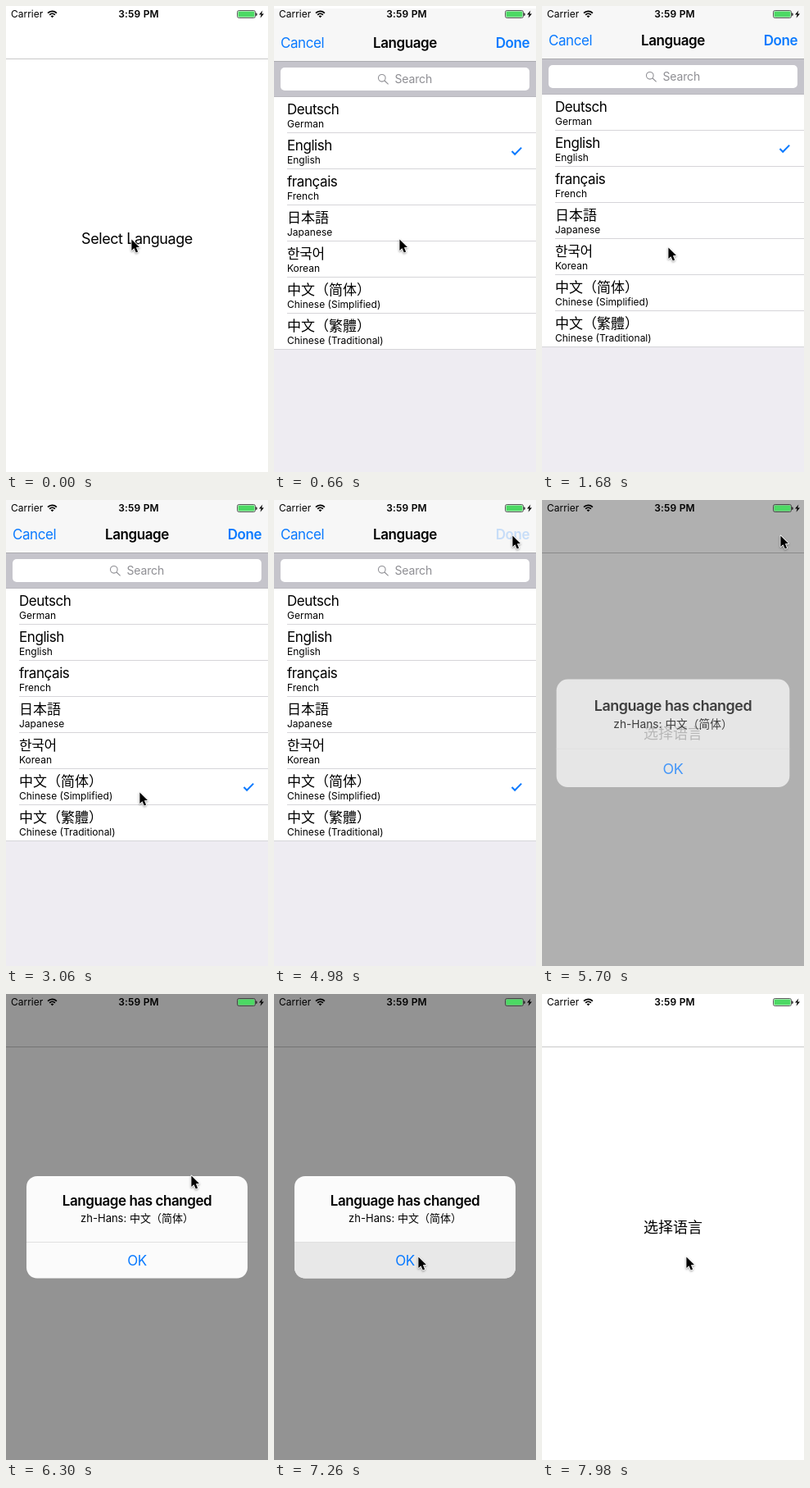
An HTML page with a canvas that plays this animation: 320x568 px, repeating every 8 s.

```html
<!DOCTYPE html>
<html lang="en">
<head>
<meta charset="utf-8">
<title>Language picker</title>
<style>
  html, body { margin: 0; width: 100%; height: 100%; overflow: hidden; background: #fff; }
  canvas { display: block; width: 320px; height: 568px; }
</style>
</head>
<body>
<canvas id="stage" width="320" height="568"></canvas>
<script>
const W = 320, H = 568, LOOP = 8000;
const ctx = document.getElementById('stage').getContext('2d');
const BLUE = '#0a7aff';

const LANGS = [
  ['Deutsch', 'German'],
  ['English', 'English'],
  ['français', 'French'],
  ['日本語', 'Japanese', 'JP'],
  ['한국어', 'Korean', 'KR'],
  ['中文（简体）', 'Chinese (Simplified)', 'SC'],
  ['中文（繁體）', 'Chinese (Traditional)', 'TC']
];

// Pointer path: time, x, y
const PATH = [
  [1500, 153, 284], [2280, 163, 356],
  [3660, 163, 356], [4620, 291, 43],
  [6120, 291, 43], [6300, 226, 220], [6720, 176, 320]
];

const clamp = v => Math.max(0, Math.min(1, v));
const ramp = (t, from, to) => clamp((t - from) / (to - from));
const smooth = p => p * p * (3 - 2 * p);

// Critically damped spring, 0 to 1
function spring(t, start) {
  const x = Math.max(0, t - start) * 0.01826;
  return 1 - (1 + x) * Math.exp(-x);
}

function text(str, x, y, size, opt = {}) {
  const { color = '#000', weight = 400, align = 'left', gap = 0, cjk = 'SC' } = opt;
  ctx.font = `${weight} ${size}px Inter, "Noto Sans CJK ${cjk}", "Noto Sans CJK", sans-serif`;
  ctx.letterSpacing = gap + 'px';
  ctx.textAlign = align;
  ctx.fillStyle = color;
  ctx.fillText(str, x, y);
}

function rect(x, y, w, h, color) {
  ctx.fillStyle = color;
  ctx.fillRect(x, y, w, h);
}

function round(x, y, w, h, r, color) {
  ctx.beginPath();
  ctx.roundRect(x, y, w, h, r);
  ctx.fillStyle = color;
  ctx.fill();
}

function trace(points, close) {
  ctx.beginPath();
  points.forEach(([x, y]) => ctx.lineTo(x, y));
  if (close) ctx.closePath();
}

function drawHome(t) {
  rect(0, 0, W, H, '#fff');
  rect(0, 64, W, 1, '#c8c8c8');
  if (t < 5000) text('Select Language', 160, 290, 18, { align: 'center', gap: -0.44 });
  else text('选择语言', 160, 291, 18, { align: 'center' });
}

function drawCheck(row, alpha) {
  const y = 108 + row * 44;
  ctx.globalAlpha = alpha;
  trace([[290.5, y + 22], [294.2, y + 25.8], [302.2, y + 17.6]]);
  ctx.strokeStyle = BLUE;
  ctx.lineWidth = 2;
  ctx.stroke();
  ctx.globalAlpha = 1;
}

function drawSearch() {
  rect(0, 64, W, 44, '#c5c4cb');
  rect(0, 64, W, 1, '#acacb0');
  rect(0, 107, W, 1, '#b9b8be');
  round(8, 72, 304, 28, 5, '#fff');
  ctx.strokeStyle = '#8e8e93';
  ctx.lineWidth = 1.1;
  ctx.beginPath();
  ctx.arc(131.8, 84.8, 4.3, 0, Math.PI * 2);
  ctx.moveTo(135, 88);
  ctx.lineTo(139.6, 92.4);
  ctx.stroke();
  text('Search', 147.5, 91, 14, { color: '#8e8e93', gap: -0.15 });
}

function drawPicker(t) {
  const up = spring(t, 265), down = spring(t, 5000);
  const offset = Math.round(H * (1 - up + down));
  if (offset >= H) return;

  ctx.save();
  ctx.translate(0, offset);
  rect(0, 0, W, H, '#eeecf2');
  rect(0, 0, W, 64, '#f7f7f7');
  text('Cancel', 8, 48, 17, { color: BLUE, gap: -0.43 });
  text('Language', 160, 48, 17, { weight: 600, align: 'center', gap: -0.43 });
  ctx.globalAlpha = t < 4860 ? 1 : 0.2 + 0.8 * ramp(t, 5000, 5300);
  text('Done', 312, 48, 17, { color: BLUE, weight: 600, align: 'right', gap: -0.43 });
  ctx.globalAlpha = 1;
  drawSearch();

  rect(0, 108, W, 44 * LANGS.length, '#fff');
  LANGS.forEach(([name, label, cjk], i) => {
    const y = 108 + i * 44;
    const ideographs = cjk && cjk !== 'KR';
    text(name, 16, y + 21, 17, { gap: ideographs ? 0 : -0.43, cjk });
    text(label, 16, y + 37, 12);
    const left = i < LANGS.length - 1 ? 16 : 0;
    rect(left, y + 43, W - left, 1, '#d6d5d9');
  });

  const swap = ramp(t, 2460, 2760);
  drawCheck(1, 1 - swap);
  drawCheck(5, swap);
  ctx.restore();
}

function drawAlert(t) {
  const shown = spring(t, 5560) * (1 - spring(t, 7270));
  if (shown < 0.004) return;

  ctx.globalAlpha = shown;
  rect(0, 0, W, H, 'rgba(0,0,0,0.425)');

  ctx.save();
  const scale = 1.2 - 0.2 * spring(t, 5560);
  ctx.translate(160, 284);
  ctx.scale(scale, scale);
  ctx.translate(-160, -284);
  round(25, 222, 270, 124.5, 13, '#fbfbfb');
  if (t >= 7200) round(25, 302, 270, 44.5, [0, 0, 13, 13], '#e8e8e8');
  rect(25, 302, 270, 1, '#e0e0e0');
  text('Language has changed', 160, 258, 17, { weight: 600, align: 'center', gap: -0.43 });
  text('zh-Hans: 中文（简体）', 160, 278, 13, { align: 'center' });
  text('OK', 160, 331, 17, { color: BLUE, align: 'center', gap: -0.43 });
  ctx.restore();
  ctx.globalAlpha = 1;
}

function drawStatus() {
  text('Carrier', 6, 14, 12);
  text('3:59 PM', 162, 14, 12, { weight: 600, align: 'center', gap: 0.2 });

  // Wi-Fi
  const up = -Math.PI / 2, half = 0.8;
  ctx.strokeStyle = '#000';
  ctx.lineWidth = 1.8;
  for (const r of [4.6, 7.6]) {
    ctx.beginPath();
    ctx.arc(56.5, 14, r, up - half, up + half);
    ctx.stroke();
  }
  ctx.beginPath();
  ctx.moveTo(56.5, 14.2);
  ctx.arc(56.5, 14.2, 2.6, up - half, up + half);
  ctx.fillStyle = '#000';
  ctx.fill();

  // Battery
  ctx.beginPath();
  ctx.roundRect(282.5, 5.5, 22, 9, 2);
  ctx.strokeStyle = '#333';
  ctx.lineWidth = 0.8;
  ctx.stroke();
  round(283.5, 6.5, 20, 7, 1, '#4cd964');
  round(305.2, 8.3, 1.5, 3.6, [0, 1.5, 1.5, 0], '#222');
  trace([[313.4, 5.4], [309, 10.6], [311.7, 10.6], [310.5, 14.8], [315, 9.4], [312.2, 9.4]], true);
  ctx.fillStyle = '#000';
  ctx.fill();
}

function pointer(t) {
  let prev = PATH[0];
  for (const next of PATH) {
    if (t < next[0]) {
      if (next === prev) break;
      const p = ramp(t, prev[0], next[0]);
      // The last leg is one sweep: speeding up, then slowing down
      const e = next[0] === 6300 ? p * p : next[0] === 6720 ? 1 - (1 - p) ** 3 : smooth(p);
      return [1, 2].map(k => prev[k] + (next[k] - prev[k]) * e);
    }
    prev = next;
  }
  return prev.slice(1);
}

function drawPointer(t) {
  const [x, y] = pointer(t);
  ctx.save();
  ctx.translate(Math.round(x) + 0.4, Math.round(y) + 0.4);
  trace([[0, 0], [0, 13.6], [3.1, 10.8], [5.4, 16], [7.7, 15], [5.5, 9.9], [9.6, 9.7]], true);
  ctx.lineJoin = 'round';
  ctx.lineWidth = 1.6;
  ctx.strokeStyle = '#fff';
  ctx.shadowColor = 'rgba(0,0,0,0.4)';
  ctx.shadowBlur = 2.5;
  ctx.shadowOffsetY = 1.2;
  ctx.stroke();
  ctx.shadowColor = 'transparent';
  ctx.fillStyle = '#000';
  ctx.fill();
  ctx.restore();
}

const origin = performance.now();

function frame() {
  const t = (performance.now() - origin) % LOOP;
  drawHome(t);
  drawPicker(t);
  drawAlert(t);
  drawStatus();
  drawPointer(t);
  requestAnimationFrame(frame);
}
frame();
</script>
</body>
</html>
```
